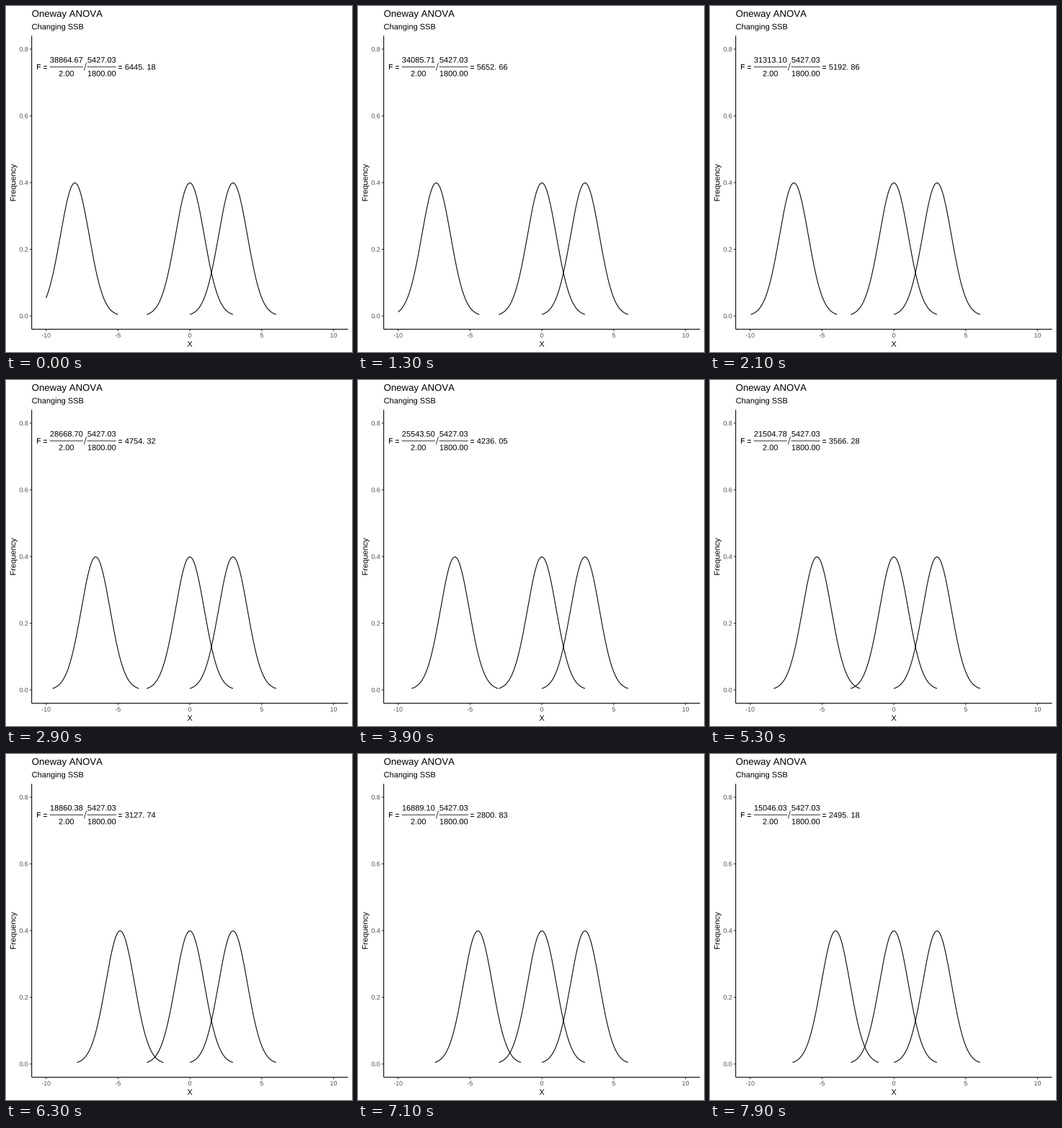
Recreate the animation shown at these times as a matplotlib script. Size 480x480 px, loop 8 s.

```python
import matplotlib.pyplot as plt
import numpy as np
from matplotlib.animation import FuncAnimation
from matplotlib.patches import PathPatch
from matplotlib.textpath import TextPath
from matplotlib.transforms import Affine2D

plt.rcParams["text.kerning_factor"] = 6  # plain advances, no pair kerning

SIZE, DPI = 480, 80
FRAMES, INTERVAL = 80, 100
LEFT, RIGHT, TOP, BOTTOM = 35.66, 474.5, 41.3, 448.4  # panel, in pixels
LINE = 1.07
FONT = {"family": "Liberation Sans"}

Z = np.linspace(-3, 3, 601)
FIXED_MEANS = (0, 3)
SSW = 3 * np.sum(Z ** 2)
DF_B, DF_W = 2, 3 * (len(Z) - 1)

fig = plt.figure(figsize=(SIZE / DPI, SIZE / DPI), dpi=DPI, facecolor="white")
ax = fig.add_axes([0, 0, 1, 1])
ax.set(xlim=(0, SIZE), ylim=(SIZE, 0))
ax.axis("off")


def px(x):
    return LEFT + (np.asarray(x) + 11) / 22 * (RIGHT - LEFT)


def py(y):
    return 430 - 462.7 * np.asarray(y)


def stroke(xs, ys, color="black", width=LINE):
    line, = ax.plot(xs, ys, color=color, lw=width * 72 / DPI, snap=False,
                    solid_capstyle="butt", solid_joinstyle="round")
    return line


def glyphs(s, x, y, size=11, center=False, angle=0):
    path = TextPath((0, 0), s, size=size, prop=FONT)
    shift = 0
    if center:
        box = path.get_extents()
        shift = -(box.x0 + box.x1) / 2
    move = Affine2D().translate(shift, 0).scale(1, -1).rotate_deg(-angle)
    return path.transformed(move.translate(x, y))


def label(s, x, y, color="black", **kw):
    return ax.add_patch(PathPatch(glyphs(s, x, y, **kw), fc=color, lw=0))


def bell(mean):
    x = mean + Z
    y = np.exp(-Z ** 2 / 2) / np.sqrt(2 * np.pi)
    keep = x >= -10 - 1e-9
    return px(x[keep]), py(y[keep])


def between_ss(mean):
    means = np.array([mean, *FIXED_MEANS])
    return len(Z) * np.sum((means - means.mean()) ** 2)


# titles and axes
label("Oneway ANOVA", LEFT, 15, size=13.2)
label("Changing SSB", LEFT, 32.4)
label("X", (LEFT + RIGHT) / 2, 472.7, center=True)
label("Frequency", 13.4, (TOP + BOTTOM) / 2, center=True, angle=90)

for v in range(-10, 11, 5):
    stroke([px(v)] * 2, [BOTTOM, BOTTOM + 2.75], "#333333")
    label(str(v), px(v), 459.8, "#4d4d4d", size=8.8, center=True)
for v in np.arange(5) / 5:
    stroke([LEFT - 2.75, LEFT], [py(v)] * 2, "#333333")
    label(f"{v:.1f}", 18.5, py(v) + 3.15, "#4d4d4d", size=8.8)
stroke([LEFT, LEFT], [TOP, BOTTOM])
stroke([LEFT, RIGHT], [BOTTOM, BOTTOM])

for mean in FIXED_MEANS:
    stroke(*bell(mean))

# F ratio
NUM, MID, DEN = 78.5, 88.4, 97.4
label("F", 41.9, MID)
label("=", 51.5, MID)
label(f"{DF_B:.2f}", 83.8, DEN, center=True)
label(f"{SSW:.2f}", 112.9, NUM)
label(f"{DF_W:.2f}", 112.9, DEN)
label("=", 155.2, MID)
for x0, x1 in ((60.7, 106.9), (112.7, 152.8)):
    stroke([x0, x1], [84.5, 84.5], width=0.75)
stroke([108.2, 111.6], [89.5, 78.8], width=0.75)

moving = stroke([], [])
ssb_text = label("0", 0, 0)
f_text = label("0", 0, 0)


def update(i):
    mean = -8 + 0.05 * i
    ssb = between_ss(mean)
    f = (ssb / DF_B) / (SSW / DF_W)
    moving.set_data(*bell(mean))
    ssb_text.set_path(glyphs(f"{ssb:.2f}", 60.9, NUM))
    f_text.set_path(glyphs(f"{f:.2f}".replace(".", ". "), 164.8, MID))
    return moving, ssb_text, f_text


anim = FuncAnimation(fig, update, frames=FRAMES, interval=INTERVAL,
                     repeat=True, repeat_delay=0)
plt.show()
```
